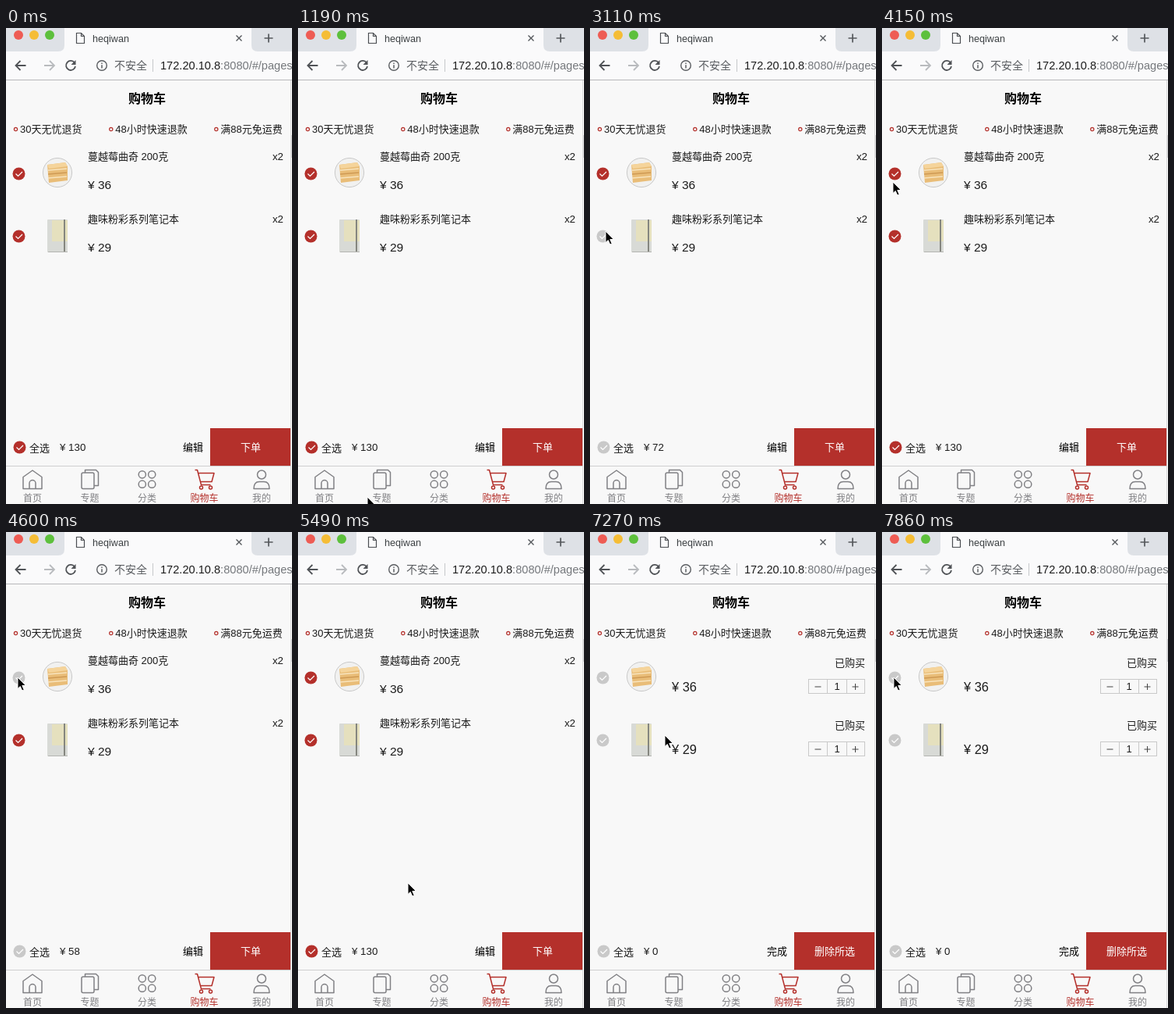
Recreate the animation shown at these times as an HTML page. Size 367 by 609 pixels, loop 8 s.

```html
<!DOCTYPE html>
<html lang="zh-CN">
<head>
<meta charset="utf-8">
<title>购物车</title>
<style>
html, body { margin: 0; width: 100%; height: 100%; overflow: hidden; background: #f8f8f8; }
svg { display: block; width: 367px; height: 609px; font-family: "Liberation Sans", "Noto Sans CJK SC", "Noto Sans CJK", sans-serif; }
text { white-space: pre; }
</style>
</head>
<body>
<svg id="stage" viewBox="0 0 367 609"></svg>
<script>
const LOOP = 8000, TICK = 148.4, LEAD = 16;
const RED = '#b4302b', GRAY = '#808084', INK = '#1c1c1c', PALE = '#c9c9c9';

// Text is placed by its vertical middle.
const text = (x, mid, size, str, { fill = INK, weight = 400, anchor = 'start', id = '' } = {}) =>
  `<text id="${id}" x="${x}" y="${mid + size * 0.36}" font-size="${size}" fill="${fill}" font-weight="${weight}" text-anchor="${anchor}">${str}</text>`;
const rect = (x, y, w, h, fill, more = '') =>
  `<rect x="${x}" y="${y}" width="${w}" height="${h}" fill="${fill}" ${more}/>`;
const circle = (x, y, r, fill, more = '') =>
  `<circle cx="${x}" cy="${y}" r="${r}" fill="${fill}" ${more}/>`;
const line = (d, color, width = 1) =>
  `<path d="${d}" fill="none" stroke="${color}" stroke-width="${width}"/>`;
const group = (id, body, more = '') => `<g id="${id}" ${more}>${body}</g>`;
const move = (x, y) => `transform="translate(${x} ${y})"`;

const check = (id, x, y) =>
  group(id, circle(0, 0, 8, RED) + line('M-4 0l3 3 5.500 -5.500', '#fff', 1.2), move(x, y));

function browser() {
  const arrow = (x, dir) => `M${x} 48h${13 * dir}M${x + 6 * dir} 42l${-6 * dir} 6 ${6 * dir} 6`;
  const lights = ['#ee5c54', '#f5bd36', '#5dc03c'].map((c, i) => circle(16 + 20 * i, 9, 6, c)).join('');
  return rect(0, 0, 367, 30, '#dee1e6') +
    rect(0, 30, 367, 36, '#fafafb') +
    '<path d="M67 30q8 0 8 -8V0H315V22q0 8 8 8z" fill="#fafafb"/>' + lights +
    line('M90.5 6.5h6l4 4v9h-10zM96.5 6.5v4h4', '#4b4e52', 1.2) +
    text(111, 13, 12.6, 'heqiwan', { fill: '#3c4043' }) +
    line('M295.5 9.5l7 7m0 -7l-7 7', '#55585c', 1.4) +
    line('M331.5 13h11M337 7.5v11', '#55585c', 1.7) +
    line(arrow(12.5, 1), '#505357', 1.8) +
    line(arrow(62, -1), '#b9bbbe', 1.8) +
    line('M88 44.5a6 6 0 1 0 1 4.5', '#505357', 1.8) +
    '<path d="M89.5 41v6h-6z" fill="#505357"/>' +
    circle(123, 48, 6.3, 'none', 'stroke="#5a5d61" stroke-width="1.4"') +
    line('M123 44.4v1.5M123 47.2v4.4', '#5a5d61', 1.5) +
    text(139, 48, 14, '不安全', { fill: '#5a5d61' }) +
    line('M188.5 40v16', '#c6c8cb') +
    text(198, 48, 14.6, '172.20.10.8<tspan fill="#75787c">:8080/#/pages</tspan>') +
    rect(0, 66, 367, 1, '#b8b8ba') +
    rect(365, 67, 1, 542, '#d9d9da') +
    rect(366, 137, 1, 29, '#d2d3d5');
}

function cake() {
  const layers = [0, 1, 2].map(i => line(`M54 ${182 + 5 * i}l24 -2`, i % 2 ? '#cf9a54' : '#f8e4bd', 1.4)).join('');
  return circle(66, 185, 18.6, '#f1f1f0', `stroke="${PALE}"`) +
    '<path d="M53 175l23 -3 3 5v18l-24 3z" fill="#e9bd78"/>' +
    '<path d="M53 175l23 -3 3 5 -24 3z" fill="#f5d49b"/>' + layers;
}

const notebook = () =>
  rect(53, 245, 26, 42, '#d8dad6', 'rx="1"') +
  rect(59, 246, 20, 27, '#e5e0be') +
  rect(74, 245, 2, 42, '#85867f') +
  line('M54 286.5h25', '#b4b5b1');

function row(i, name, price) {
  const view = text(105, 164, 13, name) +
    text(356, 164, 13.3, 'x2', { anchor: 'end' }) +
    text(105, 200, 15.5, '¥ ' + price);
  const edit = text(105, 198, 16.4, '¥ ' + price) +
    text(314, 167, 13, '已购买') +
    rect(280.5, 188.5, 72, 18, 'none', `stroke="${PALE}"`) +
    line('M304.5 188.5v18M329.5 188.5v18', PALE) +
    line('M288.5 198h8M336.5 198h8M340.5 194v8', '#444') +
    text(317, 197.5, 13, '1', { anchor: 'middle' });
  return group('', check('item' + i, 16.5, 186.5) + group('view' + i, view) + group('edit' + i, edit), move(0, 80 * i));
}

// Tab icons are drawn around their own centre.
function nav() {
  const path = d => `<path d="${d}"/>`;
  const ring = (x, y, r) => circle(x, y, r, 'none');
  const tabs = {
    '首页': path('M-12 -3L0 -11.5 12 -3V12H-12zM-4 12v-7a4 4 0 0 1 8 0v7'),
    '专题': rect(-10.5, -8.5, 16, 20.5, 'none', 'rx="2"') + path('M-6 -8.500v-3.500H8l3 3v17H5.500'),
    '分类': [-6.2, 6.2].map(x => ring(x, -6.2, 4.6) + ring(x, 6.2, 4.6)).join(''),
    '购物车': path('M-12 -12h3l5 19H8M-8 -8H12.500l-3 11H-5') + ring(-4, 10.5, 2) + ring(8, 10.5, 2),
    '我的': ring(0, -6, 5.5) + path('M-10 12q0 -9 7 -9h6q7 0 7 9z')
  };
  return rect(0, 560, 365, 1, '#cfcfd0') + Object.entries(tabs).map(([name, icon], i) => {
    const x = 34 + 73.5 * i, color = name === '购物车' ? RED : GRAY;
    return group('', icon, `${move(x, 577.5)} fill="none" stroke="${color}" stroke-width="1.5" stroke-linejoin="round"`) +
      text(x, 601.5, 12, name, { fill: color, weight: 500, anchor: 'middle' });
  }).join('');
}

const perk = (x, str) =>
  circle(x, 129.5, 2.1, 'none', `stroke="${RED}" stroke-width="1.2"`) + text(x + 5.5, 129, 13, str);

const stage = document.getElementById('stage');
stage.innerHTML = rect(0, 0, 367, 609, '#f8f8f8') + browser() +
  text(181, 90.5, 16, '购物车', { weight: 700, fill: '#000', anchor: 'middle' }) +
  perk(12.5, '30天无忧退货') + perk(134.8, '48小时快速退款') + perk(269.8, '满88元免运费') +
  cake() + notebook() +
  row(0, '蔓越莓曲奇 200克', 36) + row(1, '趣味粉彩系列笔记本', 29) +
  check('all', 17.5, 536.5) + text(30, 537, 13, '全选') +
  text(69, 536.5, 13.3, '', { id: 'total' }) +
  text(227, 536.5, 13, '', { id: 'mode', fill: '#000' }) +
  rect(262, 512, 103, 48, RED) +
  text(314, 536.5, 13, '', { id: 'action', fill: '#fff', weight: 500, anchor: 'middle' }) +
  nav() +
  '<path id="cursor" d="M0 0V14.5L3.300 11.500 5.700 17 8.200 15.900 5.800 10.500H10.400z" fill="#000" stroke="#fff"/>';

const el = id => document.getElementById(id);
const show = (id, on) => el(id).setAttribute('visibility', on ? 'visible' : 'hidden');

// Pointer stops: [arrival tick, ticks under way, x, y]
const stops = [
  [0, 1, 217, 620], [6, 1, 217, 595], [8, 1, 89, 600], [9, 1, 140, 620],
  [11, 1, 179, 594], [14, 3, 147, 558], [20, 6, 20, 260], [28, 1, 14, 197],
  [30, 2, 15, 186], [37, 1, 141, 449], [40, 3, 264, 547], [42, 2, 238, 542],
  [47, 2, 105, 269], [53, 5, 15, 186]
];

function pointerAt(tick) {
  const next = stops.findIndex(([arrive]) => arrive > tick);
  const [, , x0, y0] = stops.at(next < 0 ? -1 : next - 1);
  const [arrive, ticks, x1, y1] = stops.at(next);
  const u = Math.min(1, Math.max(0, 1 - (arrive - tick) / ticks));
  const ease = u * u * (3 - 2 * u);
  return [x0 + (x1 - x0) * ease, y0 + (y1 - y0) * ease].map(Math.round);
}

function draw(t) {
  const tick = Math.floor((t % LOOP + LEAD) / TICK);
  const within = (from, to) => tick >= from && tick < to;
  el('cursor').setAttribute('transform', `translate(${pointerAt(tick)})`);

  const editing = tick >= 42;
  const first = !editing && !within(31, 34);
  const second = !editing && !within(21, 23);
  Object.entries({ item0: first, item1: second, all: first && second }).forEach(([id, on]) =>
    el(id).firstChild.setAttribute('fill', on ? RED : PALE));
  for (const i of [0, 1]) {
    show('view' + i, !editing);
    show('edit' + i, editing);
  }
  el('total').textContent = '¥ ' + (first * 72 + second * 58);
  el('mode').textContent = editing ? '完成' : '编辑';
  el('action').textContent = editing ? '删除所选' : '下单';
}

const start = performance.now();
function play() {
  draw(performance.now() - start);
  requestAnimationFrame(play);
}
play();
</script>
</body>
</html>
```
